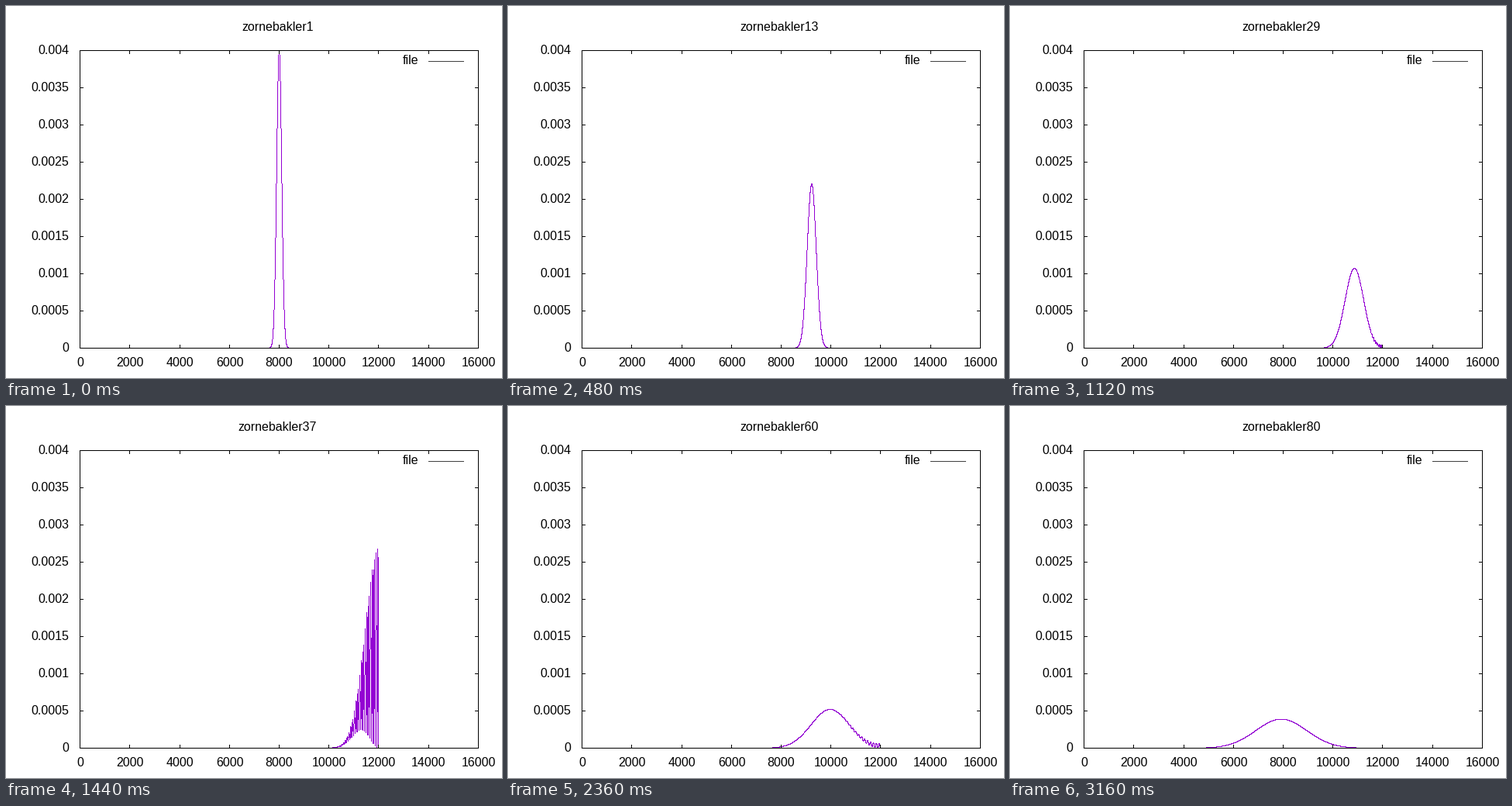
These frames come from a looping animation (640x480 px, 3200 ms). A matplotlib script:

```python
import matplotlib.pyplot as plt
import numpy as np
from matplotlib.animation import FuncAnimation

W, H = 640, 480
LEFT, RIGHT, TOP, BOTTOM = 95, 609, 57, 441
X_MAX, Y_MAX = 16000, 0.004
FRAMES, INTERVAL = 80, 40
PURPLE, GREY, BLACK = (148, 0, 211), (64, 64, 64), (0, 0, 0)

# Gaussian packet moving right towards a hard wall
START, WALL = 8000, 12000
SIGMA, WAVE_NUMBER, SPEED = 100, 0.04, 102.2
SPREAD, SPREAD_DELAY = 0.1295, 0.35

x = np.arange(X_MAX + 1)


def to_col(value):
    return np.rint(LEFT + value * (RIGHT - LEFT) / X_MAX).astype(int)


def to_row(value):
    return np.rint(BOTTOM - value * (BOTTOM - TOP) / Y_MAX).astype(int)


def packet(pos, n):
    """Free Gaussian wave packet after n steps."""
    width = 1 + 1j * SPREAD * max(n - SPREAD_DELAY, 0)
    shift = pos - START - SPEED * n
    norm = (2 * np.pi * SIGMA**2) ** -0.25 / np.sqrt(width)
    return norm * np.exp(-shift**2 / (4 * SIGMA**2 * width)
                         + 1j * WAVE_NUMBER * shift)


def density(n):
    """Packet plus its mirror image, which vanishes at the wall."""
    psi = packet(x, n) - packet(2 * WALL - x, n)
    return np.where(x < WALL, np.abs(psi) ** 2, 0)


def draw_curve(img, cols, rows, color):
    """Plot a one-pixel polyline without smoothing."""
    steps = np.maximum(np.abs(np.diff(cols)), np.abs(np.diff(rows)))
    dist = np.concatenate(([0], np.cumsum(steps)))
    s = np.arange(dist[-1] + 1)
    c = np.rint(np.interp(s, dist, cols)).astype(int)
    r = np.rint(np.interp(s, dist, rows)).astype(int)
    img[np.clip(r, TOP, BOTTOM), c] = color


x_ticks = np.arange(0, X_MAX + 1, 2000)
y_ticks = np.arange(9) * 0.0005


def draw_axes(img):
    img[[TOP, BOTTOM], LEFT:RIGHT + 1] = BLACK
    img[TOP:BOTTOM + 1, [LEFT, RIGHT]] = BLACK
    for col in to_col(x_ticks):
        img[TOP:TOP + 5, col] = BLACK
        img[BOTTOM - 4:BOTTOM + 1, col] = BLACK
    for row in to_row(y_ticks):
        img[row, LEFT:LEFT + 5] = BLACK
        img[row, RIGHT - 4:RIGHT + 1] = BLACK


def render(n):
    img = np.full((H, W, 3), 255, np.uint8)
    img[71, 545:591] = GREY
    draw_curve(img, to_col(x), to_row(density(n)), PURPLE)
    draw_axes(img)
    return img


fig = plt.figure(figsize=(W / 100, H / 100), dpi=100, facecolor="white")
ax = fig.add_axes([0, 0, 1, 1])
ax.axis("off")
picture = ax.imshow(render(0), extent=(0, W, H, 0), interpolation="nearest",
                    aspect="auto")


def label(px, py, text, align):
    return ax.text(px, py, text, ha=align, va="baseline", color="black",
                   family="Liberation Sans", size=16 * 0.72)


for tick in x_ticks:
    label(to_col(tick) + 0.5, 465, f"{tick}", "center")
for tick in y_ticks:
    label(81.5, to_row(tick) + 5, f"{tick:g}", "right")
label(532.5, 75, "file", "right")
title = label(350.4, 32, "", "center")


def update(n):
    picture.set_data(render(n))
    title.set_text(f"zornebakler{n + 1}")
    return picture, title


anim = FuncAnimation(fig, update, frames=FRAMES, interval=INTERVAL,
                     repeat=True, repeat_delay=0)
plt.show()
```
